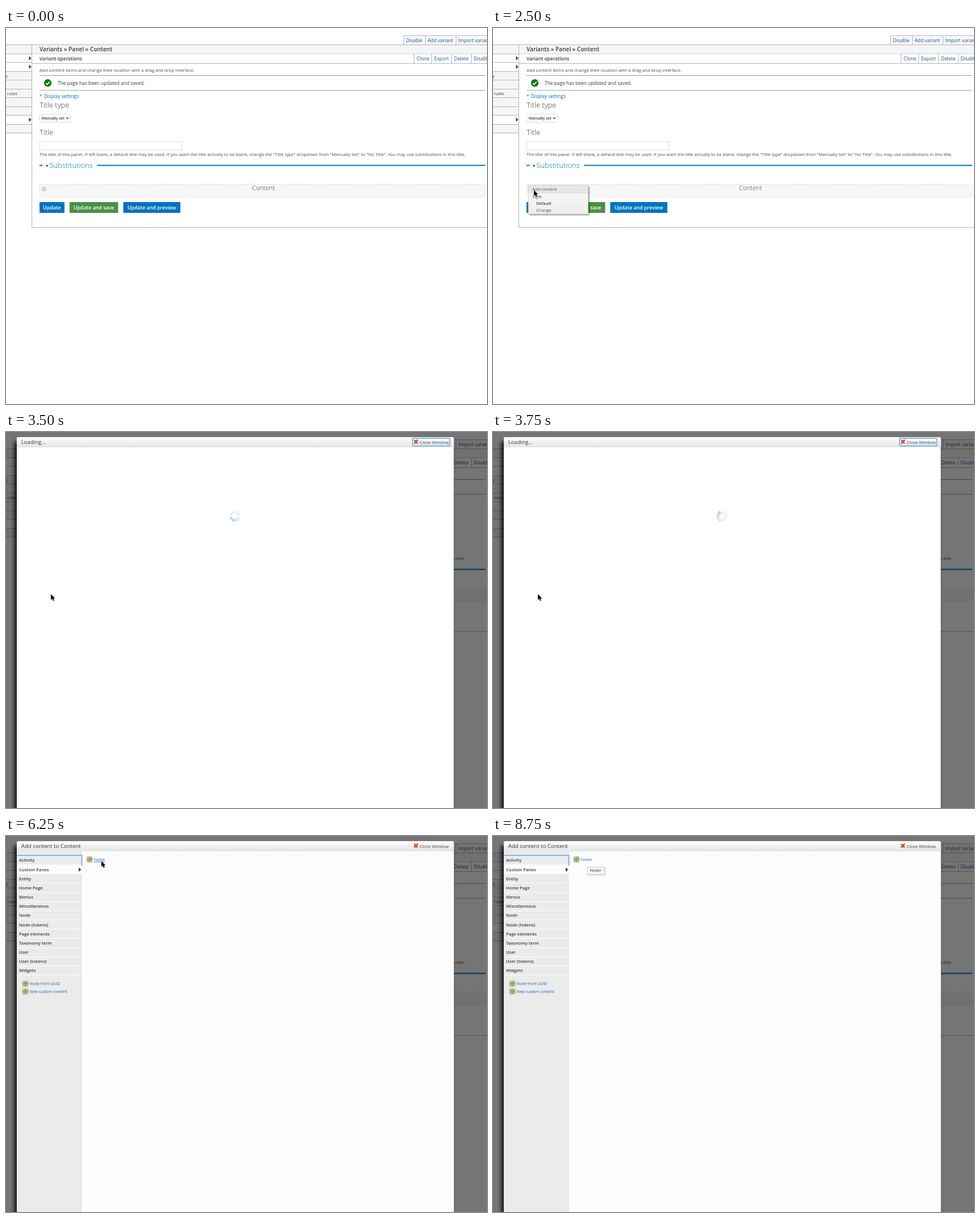
Write an HTML page that moves like this. It is 847 px wide and 661 px high and loops after 9000 ms.

```html
<!DOCTYPE html>
<html lang="en">
<head>
<meta charset="utf-8">
<title>Adding content to a panel</title>
<style>
html, body { margin: 0; width: 100%; height: 100%; overflow: hidden; background: #fff; }
svg { display: block; font-family: "Open Sans", sans-serif; }
text { white-space: pre; }
</style>
</head>
<body>
<svg id="stage" width="847" height="661" viewBox="0 0 847 661">
  <defs>
    <linearGradient id="head" x2="0" y2="1"><stop stop-color="#fdfdfd"/><stop offset="1" stop-color="#e4e4e4"/></linearGradient>
    <linearGradient id="pop" x2="0" y2="1"><stop stop-color="#fafafa"/><stop offset="1" stop-color="#ededed"/></linearGradient>
    <filter id="soft" x="-20%" y="-20%" width="140%" height="140%"><feGaussianBlur stdDeviation="3"/></filter>
    <filter id="softer" x="-20%" y="-20%" width="140%" height="140%"><feGaussianBlur stdDeviation="1.3"/></filter>
  </defs>
  <g id="page"></g>
  <g id="menu"></g>
  <g id="modal">
    <g id="frame"></g>
    <g id="loading"></g>
    <g id="loaded"></g>
    <g id="intro"></g>
    <g id="pane"></g>
    <g id="tip"></g>
  </g>
  <path id="cursor" d="M0 0V10.2L2.3 8.1L4 11.9L5.8 11.1L4.2 7.4H7.4Z" fill="#000" stroke="#fff" stroke-width=".9" paint-order="stroke"/>
</svg>
<script>
const LOOP = 9000, STEP = 250;
const $ = id => document.getElementById(id);
const BLUE = '#0074bd', NAVY = '#1d4d92', LINK = '#1662b8', INK = '#3b3b3b', EDGE = '#b4b4b4', RING = '#82b8ee';

const rect = (x, y, w, h, fill, more = '') =>
  `<rect x="${x}" y="${y}" width="${w}" height="${h}" fill="${fill}" ${more}/>`;
const text = (x, y, str, size, fill = INK, weight = 400, more = '') =>
  `<text x="${x}" y="${y}" font-size="${size}" fill="${fill}" font-weight="${weight}" ${more}>${str}</text>`;
const path = (d, fill, more = '') => `<path d="${d}" fill="${fill}" ${more}/>`;
const hline = (x, y, w, fill = EDGE) => rect(x, y, w, 1, fill);
const vline = (x, y, h, fill = EDGE) => rect(x, y, 1, h, fill);
const MIDDLE = 'text-anchor="middle"';

function sideNav() {
  const ys = [29, 45, 60, 76, 91, 107, 122, 138, 153, 169, 184];
  const open = [1, 2, 8];
  let out = '';
  ys.slice(0, -1).forEach((y, i) => {
    const h = ys[i + 1] - y;
    if (!open.includes(i)) out += rect(0, y, 45, h, '#f5f5f5');
    else out += path(`M40.5 ${y + 4.3}l4.2 3.9l-4.2 3.9z`, '#444');
  });
  ys.forEach(y => { out += hline(0, y, 45); });
  return out + text(-1.2, 87, 'y', 7.8) + text(2, 117.6, 'rules', 7.8);
}

function tabs(y, h, cells) {
  return cells.map(([edge, x, label]) => vline(edge, y, h) + text(x, y + 11.5, label, 8.42, NAVY)).join('');
}

function button(x, w, fill, label) {
  return rect(x, 306, w, 19, fill) + text(x + w / 2, 318.8, label, 8.85, '#fff', 600, MIDDLE);
}

function gear(x, y) {
  let out = `<circle cx="${x}" cy="${y}" r="4.3" fill="#e9e9e9" stroke="#cfcfcf" stroke-width=".7"/>`;
  out += `<circle cx="${x}" cy="${y}" r="2.4" fill="none" stroke="#aaa" stroke-width="1.2" stroke-dasharray="1.2 .7"/>`;
  return out + `<circle cx="${x}" cy="${y}" r="1" fill="#f8f8f8"/>`;
}

function boxIcon(x, y) {
  return rect(x + .5, y + .5, 9.4, 9.4, '#eef0d8', 'rx="1.5" stroke="#8c9a55"') +
    path(`M${x + 2} ${y + 3.4}l3 -1.4l3.4 1v4l-3 1.6l-3.4 -1.2z`, '#b5c07a', 'stroke="#66752e" stroke-width=".7"') +
    path(`M${x + 2} ${y + 3.4}l3.4 1l3 -1.4M${x + 5.4} ${y + 4.4}v4.2`, 'none', 'stroke="#66752e" stroke-width=".7"');
}

$('page').innerHTML =
  rect(0, 0, 847, 661, '#fff') + sideNav() +
  hline(700, 13, 147) + rect(701, 14, 146, 15, '#fafafa') +
  tabs(13, 16, [[700, 704.5, 'Disable'], [738, 742.5, 'Add variant'], [792, 796.5, 'Import variant']]) +
  rect(46, 30, 801, 15, '#f5f5f5') + hline(45, 29, 802) + hline(45, 45, 802, '#d0d0d0') + hline(45, 62, 802) +
  vline(45, 29, 322) + hline(45, 350, 802) +
  text(59, 40.6, 'Variants » Panel » Content', 10.1, INK, 600) +
  text(59, 56.8, 'Variant operations', 8.38, INK, 600) +
  tabs(45, 17, [[718, 723, 'Clone'], [749, 754, 'Export'], [784, 789, 'Delete'], [819, 823.5, 'Disable']]) +
  text(59, 77.3, 'Add content items and change their location with a drag and drop interface.', 7.76, '#4a4a4a') +
  hline(59, 83, 785, '#86a875') + hline(59, 109, 785, '#9fa89b') +
  '<circle cx="73.5" cy="96.7" r="6.6" fill="#0b750b"/>' +
  path('M70.3 96.9l2.3 2.4l4.2 -4.6', 'none', 'stroke="#fff" stroke-width="1.8"') +
  text(91, 99.8, 'The page has been updated and saved.', 8.42) +
  path('M58.8 117h5l-2.5 4.2z', '#aaa') +
  text(66.7, 122.8, 'Display settings', 8.42, '#0068b4') +
  text(59, 139.8, 'Title type', 12.9, INK, 300) +
  rect(59.5, 151.5, 54, 14, '#fff', 'rx="2" stroke="#dcdcdc"') +
  text(62.5, 161, 'Manually set', 7.2, '#222', 400, 'font-family="Liberation Sans, Arial, sans-serif"') +
  path('M105.7 157.4l2.2 2.3l2.2 -2.3', 'none', 'stroke="#333" stroke-width="1.1"') +
  text(59, 188, 'Title', 12.9, INK, 300) +
  rect(59.5, 199.5, 250, 15, '#fff', 'stroke="#dedede"') +
  text(59, 225, 'The title of this panel. If left blank, a default title may be used. If you want the title actually to be blank, change the "Title type" dropdown from "Manually Set" to "No Title". You may use substitutions in this title.', 7.76, '#4a4a4a') +
  rect(59, 240.5, 5.6, 2, BLUE) + rect(160.5, 240.5, 683.5, 2, BLUE) +
  path('M71.2 239.8l2.9 2.4l-2.9 2.4z', '#222') +
  text(76.3, 246.4, 'Substitutions', 13, BLUE, 300) +
  rect(59.5, 274.5, 784.5, 22.5, '#f7f7f7', 'rx="2" stroke="#d9d9d9" stroke-dasharray="3 2"') +
  gear(67.3, 283) +
  text(453.5, 285.2, 'Content', 11.2, INK, 300, MIDDLE) +
  button(59, 44, BLUE, 'Update') +
  button(112, 85.5, '#4a9046', 'Update and save') +
  button(206.5, 100.5, BLUE, 'Update and preview');

$('menu').innerHTML =
  rect(64, 279, 105.5, 50, '#000', 'opacity=".45" filter="url(#softer)"') +
  rect(62.5, 276.5, 105, 50.5, 'url(#pop)', 'stroke="#d2d2d2"') +
  '<g id="hover">' + rect(63, 277, 104, 13, '#e7e7e7') + hline(63, 289.5, 104, '#d4d4d4') + '</g>' +
  text(69, 286, 'Add content', 7.6, '#555') + text(69, 298.8, 'Style', 7.6, '#444') +
  text(76, 311.2, 'Default', 7.5, '#444', 600) + text(76, 323.4, 'Change', 7.6, '#555');

$('frame').innerHTML =
  rect(0, 0, 847, 661, '#000', 'opacity=".54"') +
  rect(14, 17, 772, 680, '#000', 'opacity=".75" filter="url(#soft)"') +
  path('M19 661V12q0 -3 3 -3H785.5q3 0 3 3V661z', '#fff') +
  path('M19 27V12q0 -3 3 -3H785.5q3 0 3 3V27z', 'url(#head)') +
  path('M719 14l5.6 6.2M725 13.6l-6 6.8', 'none', 'stroke="#d9481c" stroke-width="2.7"') +
  text(728.3, 20.6, 'Close Window', 7.82, '#444') +
  rect(716, 11, 65.5, 13.5, 'none', `id="closeRing" rx="1" stroke="${RING}" stroke-width="2"`);

$('loading').innerHTML = text(26.8, 21.2, 'Loading...', 9.6, '#333') +
  '<g id="spinner" transform="translate(403.2 148.2)">' +
  Array.from({ length: 12 }, (_, i) =>
    `<path d="M0 -5.2V-9.8" stroke="#5f9fe6" stroke-width="1.9" transform="rotate(${i * 30})"/>`).join('') + '</g>';

const ROW = 16.17;
const categories = ['Activity', 'Custom Panes', 'Entity', 'Home Page', 'Menus', 'Miscellaneous', 'Node',
  'Node (tokens)', 'Page elements', 'Taxonomy term', 'User', 'User (tokens)', 'Widgets'];

$('loaded').innerHTML =
  text(26.8, 21.2, 'Add content to Content', 9.63, '#333') +
  rect(133, 27, 655.5, 634, '#fcfcfc') + rect(19, 27, 114, 634, '#ebebeb') + vline(132, 27, 634, '#dcdcdc') +
  hline(19, 34, 113, '#f8f8f8') +
  categories.map((_, i) => hline(19, Math.round(50 + i * ROW), 113, '#fbfbfb')).join('') +
  '<g id="active">' + rect(19, 51, 114, 15.5, '#fcfcfc') + path('M128 55.2l4.3 3.9l-4.3 3.9z', '#444') +
  path('M19 34H133.6V52', 'none', `stroke="${RING}" stroke-width="2"`) + '</g>' +
  categories.map((name, i) => text(23, (45.3 + i * ROW).toFixed(1), name, 7.65, '#3c3c3c', 600,
    i === 1 ? 'id="custom"' : '')).join('') +
  boxIcon(29, 254.5) + text(41.6, 262.4, 'Node from UUID', 6.88, LINK) +
  boxIcon(29, 268.2) + text(41.6, 276.1, 'New custom content', 6.88, LINK);

$('intro').innerHTML = text(459.5, 43.4,
  'Content options are divided by category. Please select a category from the left to proceed.', 7.77, '#222', 400, MIDDLE);
$('pane').innerHTML = boxIcon(142, 36) + text(154.8, 44, 'footer', 6.95, LINK, 400, 'id="footer"');
$('tip').innerHTML = rect(167, 55.3, 31, 14, '#000', 'opacity=".15" filter="url(#softer)"') +
  rect(166.5, 54.5, 30, 13, '#f5f5f5', 'stroke="#cfcfcf"') + text(170.8, 63.3, 'footer', 7, '#333');

// time, x, y of the pointer tip
const route = [
  [250, 708, 46], [500, 570, 175], [750, 390, 295], [1000, 170, 346], [1250, 82, 290], [1500, 65, 285],
  [2250, 65, 285], [2750, 79, 285], [3750, 79, 285], [4000, 76, 240], [4250, 62, 111], [4500, 55, 72],
  [4750, 55.5, 60], [5500, 55.5, 60], [5750, 80, 58], [6000, 135, 48], [6250, 168, 44]
];

function pointAt(t) {
  const i = route.findIndex(p => p[0] > t);
  if (i < 0) return route[route.length - 1].slice(1);
  if (i === 0) return route[0].slice(1);
  const [a, b] = [route[i - 1], route[i]];
  const k = (t - a[0]) / (b[0] - a[0]);
  return [a[1] + (b[1] - a[1]) * k, a[2] + (b[2] - a[2]) * k];
}

const show = (id, on) => { $(id).style.display = on ? '' : 'none'; };
const underline = (id, on) => { $(id).style.textDecoration = on ? 'underline' : 'none'; };
const ticks = [...$('spinner').children];

function draw(time) {
  const t = Math.floor(time / STEP) * STEP;
  const within = (from, to = LOOP) => t >= from && t < to;

  show('menu', within(2000, 3500));
  show('hover', within(2500));
  show('modal', within(3500));
  show('loading', within(3500, 4000));
  show('loaded', within(4000));
  show('intro', within(4000, 5250));
  show('closeRing', within(3500, 5000));
  show('active', within(5250));
  show('pane', within(5250));
  show('tip', within(8250));
  underline('custom', within(4750, 5750));
  underline('footer', within(6250, 8500));

  const lead = 8 + (t - 3500) / STEP * 3;
  ticks.forEach((tick, i) => {
    const age = (((lead - i) % 12) + 12) % 12;
    tick.setAttribute('opacity', (.25 + .65 * Math.max(0, 1 - age / 5)).toFixed(2));
  });

  const [x, y] = pointAt(t);
  show('cursor', within(250, 8500));
  $('cursor').setAttribute('transform', `translate(${x} ${y})`);
}

const start = performance.now();
function tick() {
  draw((performance.now() - start) % LOOP);
  requestAnimationFrame(tick);
}
tick();
</script>
</body>
</html>
```
